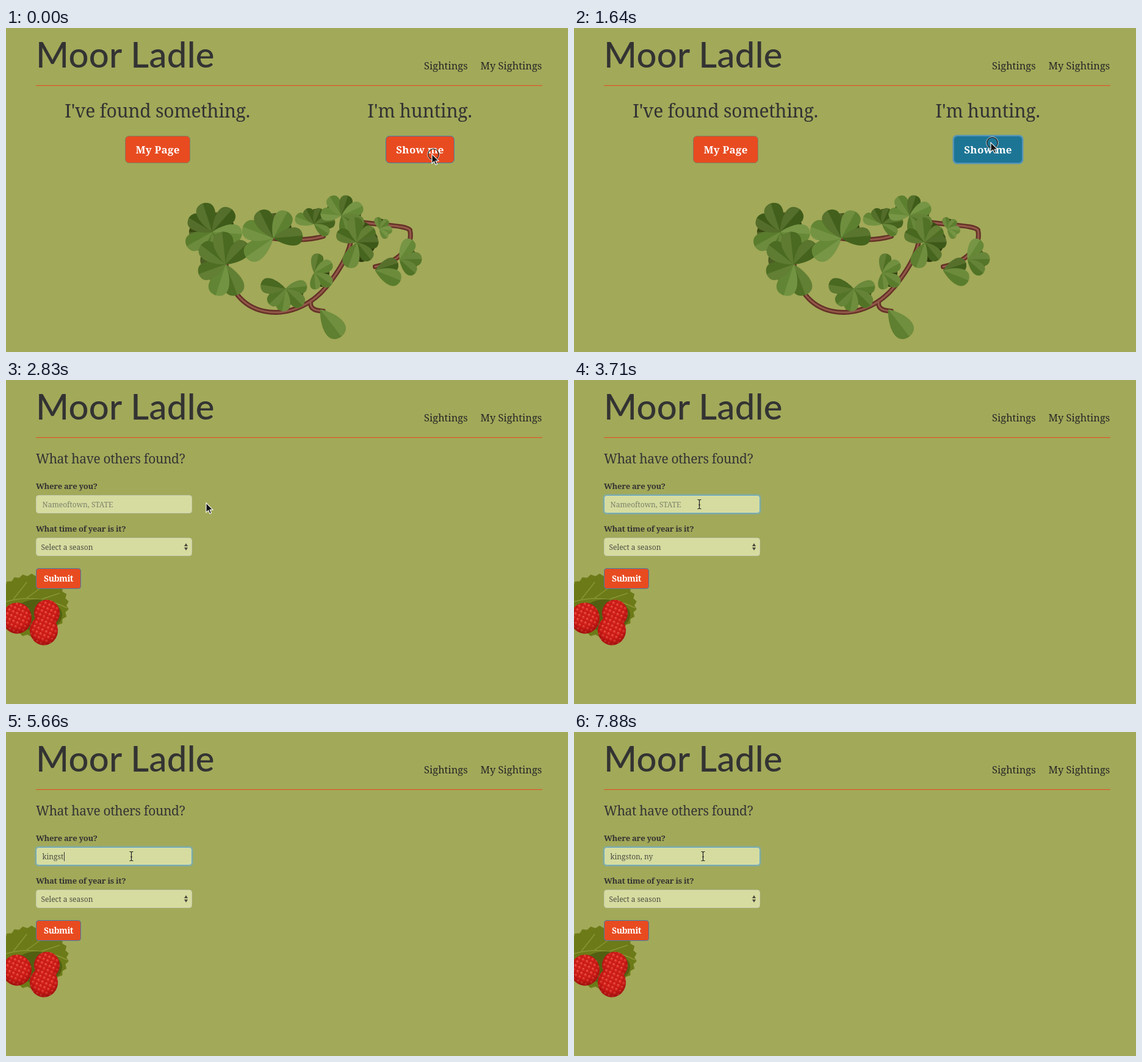
Animation, 921 px wide and 532 px high, one loop 8 s. Source, as an HTML page:

```html
<!DOCTYPE html>
<html lang="en">
<head>
<meta charset="utf-8">
<title>Moor Ladle</title>
<style>
  html, body { margin: 0; width: 100%; height: 100%; overflow: hidden; background: #a2a959; }
  svg { display: block; width: 100%; height: 100%; }
  text { font-family: "Noto Serif", serif; fill: #333; white-space: pre; }
  .logo { font: 500 58px Lato, sans-serif; letter-spacing: .3px; }
  .nav { font-size: 16.5px; fill: #262626; }
  .big { font-size: 30px; font-weight: 300; letter-spacing: -.25px; text-anchor: middle; }
  .head { font-size: 21px; font-weight: 300; letter-spacing: -.36px; }
  .label { font-size: 13px; font-weight: 700; letter-spacing: -.25px; }
  .input { font-size: 12px; fill: #4b4d40; }
  .button { font-size: 17px; font-weight: 700; letter-spacing: .2px; fill: #fff; text-anchor: middle; }
  .submit { font-size: 14px; letter-spacing: -.5px; }
  .field { fill: #d6dca0; stroke: #c6cbb0; }
  .red { fill: #e84b20; stroke: #7d7f60; }
  .blue { stroke: #3d7fae; }
  .hover { fill: #1d7595; stroke: #4a8fbe; }
  .focus { stroke: #62a9d4; }
  .hint { fill: #7d8068; }
  .stem { fill: none; stroke-linecap: round; }
</style>
</head>
<body>
<svg viewBox="0 0 921 532">
  <defs>
    <g id="leaf">
      <path d="M0 0C.2-.3 .95-.9 1 0C.95 .9 .2 .3 0 0"/>
      <path d="M0 0C.2-.3 .95-.9 1 0Z" fill="#e4f0a0" opacity=".13"/>
    </g>
    <g id="stems">
      <path d="M360 380C364 480 470 492 525 425C553 390 570 360 569 312"/>
      <path d="M327 348C345 368 380 367 403 365L434 347"/>
      <path d="M400 338C440 348 485 352 520 342"/>
      <path d="M575 318C625 325 656 324 662 332C668 362 640 385 605 392"/>
      <path d="M499 450C498 462 508 464 520 465"/>
    </g>
    <pattern id="seeds" width="7" height="7" patternUnits="userSpaceOnUse" patternTransform="rotate(25)">
      <rect width="7" height="7" fill="#c81b17"/>
      <circle cx="3.5" cy="3.5" r="2.6" fill="#dd2c22"/>
      <circle cx="3" cy="2.8" r="1" fill="#ee7265"/>
    </pattern>
    <radialGradient id="shade" cx=".5" cy=".4" r=".6">
      <stop offset=".55" stop-color="#a00" stop-opacity="0"/>
      <stop offset="1" stop-color="#7c0808" stop-opacity=".6"/>
    </radialGradient>
  </defs>

  <rect width="921" height="532" fill="#a2a959"/>
  <text class="logo" x="49" y="65">Moor Ladle</text>
  <text class="nav" x="685" y="68">Sightings</text>
  <text class="nav" x="777.5" y="68">My Sightings</text>
  <path d="M49 94.5H879" stroke="#e84b20"/>

  <g id="home">
    <text class="big" x="248" y="147">I've found something.</text>
    <text class="big" x="678" y="147">I'm hunting.</text>
    <rect class="red" x="195.5" y="177.5" width="106" height="44" rx="6"/>
    <text class="button" x="248.5" y="206">My Page</text>
    <rect id="halo" x="620.5" y="175.5" width="116" height="48" rx="7" fill="#5a96b4"/>
    <rect id="show" class="red blue" x="622.5" y="177.5" width="112" height="44" rx="6"/>
    <text class="button" x="678.5" y="206">Show me</text>
    <use href="#stems" class="stem" stroke="#653126" stroke-width="8"/>
    <use href="#stems" class="stem" stroke="#93594a" stroke-width="3"/>
    <g id="plant"></g>
  </g>

  <g id="search">
    <path id="foliage" fill="#6c7b18"/>
    <path fill="none" stroke="#8c9634" stroke-width="1.5" d="M0 364Q50 350 100 374M12 360L34 332M34 358L64 336M58 360L88 350"/>
    <ellipse cx="52" cy="386" rx="40" ry="26" fill="#424e0e" opacity=".6"/>
    <g id="berries"></g>
    <text class="head" x="49" y="137">What have others found?</text>
    <text class="label" x="49" y="179">Where are you?</text>
    <rect id="glow" x="47" y="187" width="260" height="34" rx="6" fill="#82aca0" opacity=".65"/>
    <rect id="town" class="field" x="49.5" y="189.5" width="255" height="29" rx="4"/>
    <text id="entry" class="input" x="59.5" y="209"></text>
    <rect id="caret" y="197" width="1" height="15" fill="#333"/>
    <text class="label" x="49" y="249">What time of year is it?</text>
    <rect class="field" x="49.5" y="259.5" width="255" height="29" rx="4"/>
    <text class="input" x="57.5" y="279">Select a season</text>
    <path d="M292 273L295 268L298 273ZM292 275L295 280L298 275Z" fill="#484b3c"/>
    <rect class="red blue" x="49.5" y="309.5" width="73" height="33" rx="4"/>
    <text class="button submit" x="86" y="331">Submit</text>
  </g>

  <g id="pointer">
    <g id="ring" fill="none">
      <circle cx="2.5" cy=".5" r="9.8" stroke="#eee"/>
      <circle cx="2.5" cy=".5" r="8.8" stroke="#222" stroke-width="1.2"/>
    </g>
    <path id="arrow" d="M0 0V15.5L3.6 12.2L6 17.6L8.6 16.5L6.2 11.2H11Z" fill="#111" stroke="#fff" stroke-width="1.1"/>
    <path id="beam" d="M-3-7.5H-1.2L0-6.5L1.2-7.5H3M0-6.5V6.5M-3 7.5H-1.2L0 6.5L1.2 7.5H3M-1.5 1H1.5" fill="none" stroke="#222" stroke-width="1.2"/>
  </g>
</svg>
<script>
const $ = id => document.getElementById(id);
const add = (id, markup) => $(id).insertAdjacentHTML('beforeend', markup);

let seed = 7;
const random = () => (seed = seed * 16807 % 2147483647) / 2147483647;

// Leaves fan out from a node, away from the middle of the plant.
function fan(x, y, size, count, color) {
  const outward = Math.atan2(y - 400, x - 460) * 180 / Math.PI;
  for (let i = 0; i < count; i++) {
    const angle = outward + (i - (count - 1) / 2) * 50 + (random() - .5) * 16;
    const length = size * (.85 + random() * .25);
    add('plant', `<use href="#leaf" fill="${color()}"
      transform="translate(${x} ${y}) rotate(${angle}) scale(${length} ${length * .65})"/>`);
  }
}

const dark = () => `hsl(80 62% ${14 + random() * 5}%)`;
const green = () => {
  const light = 22 + random() * 16;
  return `hsl(86 ${80 - light}% ${light}%)`;
};
// Node x, y, leaf length, leaf count.
const nodes = [[338, 335, 46, 7], [360, 388, 52, 6], [438, 345, 50, 5], [458, 428, 40, 5],
  [505, 402, 32, 4], [505, 322, 32, 5], [550, 308, 36, 6], [575, 352, 42, 6],
  [645, 380, 36, 3], [612, 330, 20, 4], [605, 398, 42, 2], [515, 462, 52, 1]];
for (const [x, y, size, count] of nodes) fan(x, y, size * .8, count - 1, dark);
for (const node of nodes) fan(...node, green);

// Toothed outline of the leaf behind the berries.
const teeth = Array.from({ length: 52 }, (_, i) => {
  const angle = i * Math.PI / 26, reach = i % 2 ? 1.02 : .95;
  return [42 + 60 * reach * Math.cos(angle), 370 + 51 * reach * Math.sin(angle)];
});
$('foliage').setAttribute('d', `M${teeth.join('L')}Z`);

for (const [x, y, r] of [[67, 383, 21], [18, 391, 24], [62, 411, 23]])
  for (const fill of ['seeds', 'shade'])
    add('berries', `<ellipse cx="${x}" cy="${y}" rx="${r}" ry="${r * 1.06}" fill="url(#${fill})"/>`);

const LOOP = 8000, TICK = 148.7, LEAD = 10;
const HOVER = 8, PRESS = 11, PAGE = 12, FOCUS = 22, TYPE = 28;
const script = 'ki-ng---s-to-n-, -n-y'; // one character per tick, "-" is a pause
const moves = [[7, 9, 683, 188], [13, 14, 678, 196], [15, 21, 205.5, 204], [52, 53, 211.5, 204]];

const within = (n, from, to) => n >= from && n < to;
const show = (id, on) => $(id).style.display = on ? '' : 'none';
const mark = (id, name, on) => $(id).classList.toggle(name, on);

function ease(p) {
  p = Math.min(1, Math.max(0, p));
  return p * p * (3 - 2 * p);
}

function pointerAt(n) {
  let x = 698, y = 207;
  for (const [from, to, endX, endY] of moves) {
    const p = ease((n - from) / (to - from));
    x += (endX - x) * p;
    y += (endY - y) * p;
  }
  return [x, y];
}

function draw(time) {
  const n = Math.floor((time % LOOP + LEAD) / TICK);
  const [x, y] = pointerAt(n);
  const typed = script.slice(0, Math.max(0, n - TYPE + 1)).replaceAll('-', '');

  show('home', n < PAGE);
  show('search', n >= PAGE);
  show('halo', n >= PRESS);
  mark('show', 'hover', n >= HOVER);

  show('glow', n >= FOCUS);
  mark('town', 'focus', n >= FOCUS);
  $('entry').textContent = typed || 'Nameoftown, STATE';
  mark('entry', 'hint', !typed);
  show('caret', within(n, FOCUS, 25) || within(n, TYPE, 51));
  $('caret').setAttribute('x', Math.round(60 + (typed && $('entry').getComputedTextLength())));

  $('pointer').setAttribute('transform', `translate(${x} ${y})`);
  show('ring', n < 1 || n === 4 || n === PRESS);
  show('arrow', x > 306);
  show('beam', x <= 306);
}

const start = performance.now();
function tick() {
  draw(performance.now() - start);
  requestAnimationFrame(tick);
}
tick();
</script>
</body>
</html>
```
